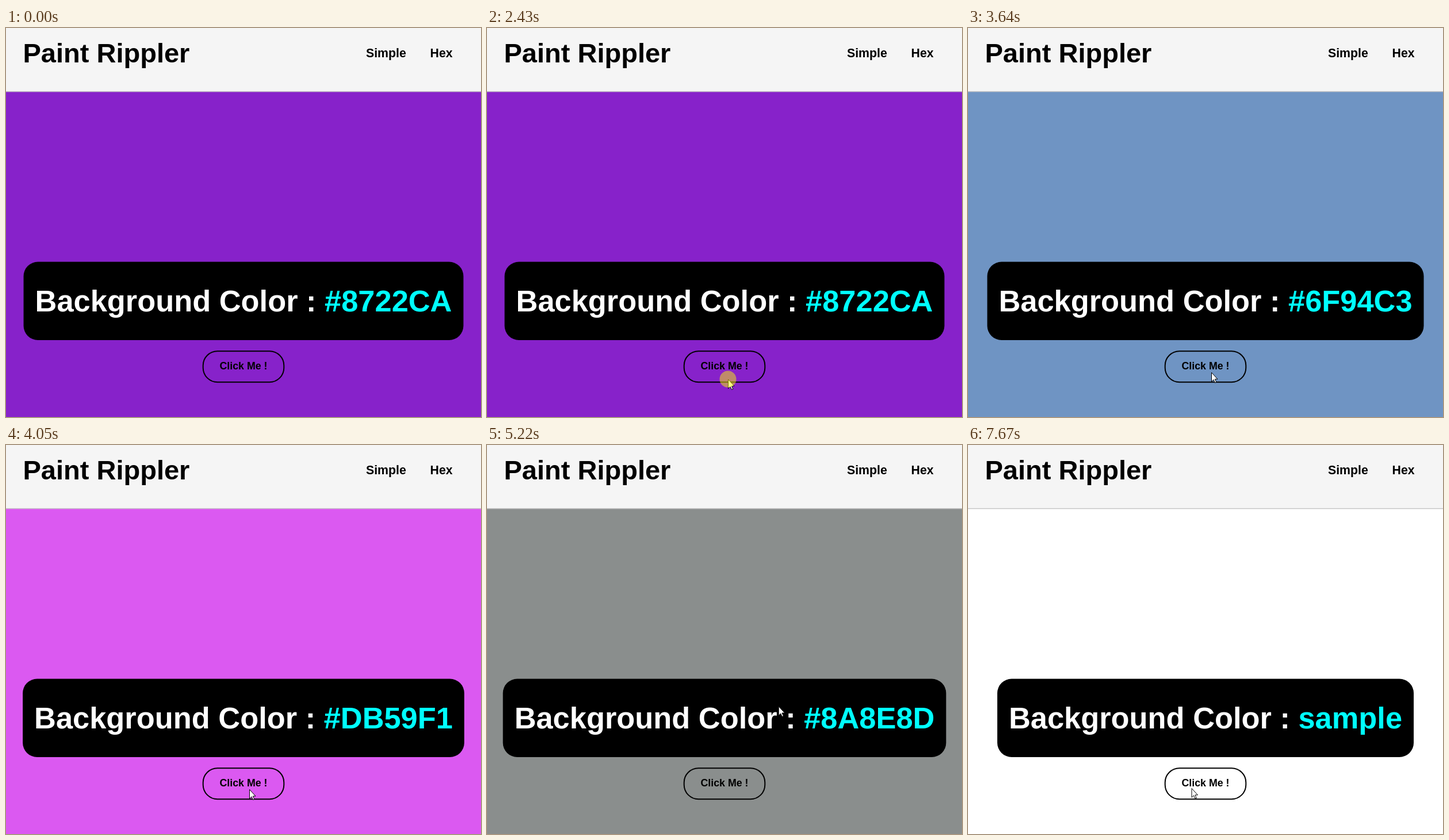
These frames come from a looping animation (826 by 678 pixels, 8000 ms). An HTML page:

```html
<!DOCTYPE html>
<html lang="en">
<head>
<meta charset="utf-8">
<title>Paint Rippler</title>
<style>
  html, body { margin: 0; width: 100%; height: 100%; overflow: hidden; }
  svg { display: block; width: 826px; height: 678px; }
  text { font: bold 21.3px "Liberation Sans", Arial, sans-serif; white-space: pre; }
  #title { font-size: 47px; }
  #label { font-size: 52.4px; fill: #fff; text-anchor: middle; }
  #value { fill: #0ff; }
  #caption { font-size: 17.8px; text-anchor: middle; }
  #cursor path { fill: #fff; stroke: #000; stroke-linejoin: round; }
</style>
</head>
<body>
<svg viewBox="0 0 826 678">
  <rect id="page" width="826" height="678"/>
  <rect width="826" height="110" fill="#f5f5f5"/>
  <rect y="110" width="826" height="1.5" fill="#c8c8c8"/>
  <text id="title" x="29.5" y="60">Paint Rippler</text>
  <text x="626" y="51">Simple</text>
  <text id="hex" x="737.5" y="51">Hex</text>

  <rect id="panel" y="407.5" height="136.5" rx="25"/>
  <text id="label" x="413" y="494">Background Color : <tspan id="value"></tspan></text>

  <rect x="342.7" y="563.2" width="140.6" height="54" rx="25" fill="none" stroke="#000" stroke-width="2"/>
  <text id="caption" x="413" y="595">Click Me !</text>

  <g id="cursor">
    <path id="arrow" d="M.5.5V16.3L4 12.9 6.5 18.3 8.8 17.3 6.4 12H11Z"/>
    <path id="hand" d="M-1.6 14V1.8Q-1.6.4 0 .4T1.6 1.8V8Q3.6 6.6 4.3 8.7 6.2 7.4 6.6 9.6 8.5 8.8 8.5 11V15Q8.5 18 6.3 22H-1.6Q-3 18-6 14.6-7.2 12.6-6.2 11.6-4.4 10.8-1.6 14Z"/>
    <circle id="press" r="14.5" fill="#ff0" fill-opacity=".48"/>
  </g>
</svg>
<script>
const LOOP = 8000, ENTER = 110;
const FIRST_CLICK = 2428, CLICK_GAP = 348, HOLD = 112;
const LINK_CLICK = 6160, PAGE_LOAD = 6400;

// the opening colour, then one more for each click on the button
const colors = ['#8722CA', '#5C9A48', '#04D3AA', '#B8806E', '#6F94C3',
                '#DB59F1', '#C7A35D', '#A0DC2F', '#8A8E8D'];
const clicks = colors.slice(1).map((_, i) => FIRST_CLICK + i * CLICK_GAP);
const presses = [...clicks, LINK_CLICK];

// each move is a Bézier curve that starts where the previous one ended
const moves = [
  { start: ENTER, end: 260, curve: [[617, 608], [502, 558]] },
  { start: 760, end: 2290, curve: [[502, 558], [-70, -39], [935, -39], [419, 612]] },
  { start: 2540, end: 2940, curve: [[419, 612], [423, 600]] },
  { start: 4980, end: 5700, curve: [[423, 600], [743.5, 45]] },
  { start: PAGE_LOAD, end: 6950, curve: [[743.5, 45], [374, 517]] },
  { start: 7000, end: 7300, curve: [[374, 517], [388.5, 598]] }
];

const $ = id => document.getElementById(id);
const show = (node, on) => node.setAttribute('visibility', on ? 'inherit' : 'hidden');
const clamp = k => Math.min(1, Math.max(0, k));
const smooth = k => k * k * (3 - 2 * k);
const mix = (a, b, k) => a.map((v, i) => v + (b[i] - v) * k);

function bezier(points, k) {
  if (points.length === 1) return points[0];
  return bezier(points.slice(1).map((p, i) => mix(points[i], p, k)), k);
}

function pointerAt(t) {
  const { start, end, curve } = moves.findLast(move => move.start <= t) || moves[0];
  return bezier(curve, smooth(clamp((t - start) / (end - start))));
}

function valueAt(t) {
  if (t >= PAGE_LOAD) return 'sample';
  return colors[clicks.filter(down => t >= down + HOLD).length];
}

function showValue(value) {
  if ($('value').textContent === value) return;
  $('value').textContent = value;
  $('page').setAttribute('fill', value === 'sample' ? '#fff' : value);
  const width = $('label').getComputedTextLength() + 40;
  $('panel').setAttribute('width', width);
  $('panel').setAttribute('x', 413 - width / 2);
}

function draw() {
  const t = performance.now() % LOOP;
  const [x, y] = pointerAt(t);
  const overLink = x > 732 && y < 62;
  showValue(valueAt(t));
  $('hex').setAttribute('fill', overLink ? '#b9cddc' : '#000');
  $('cursor').setAttribute('transform', `translate(${x} ${y})`);
  $('cursor').setAttribute('visibility', t < ENTER ? 'hidden' : 'visible');
  show($('arrow'), !overLink);
  show($('hand'), overLink);
  show($('press'), presses.some(down => t >= down && t < down + HOLD));
  requestAnimationFrame(draw);
}
draw();
</script>
</body>
</html>
```
